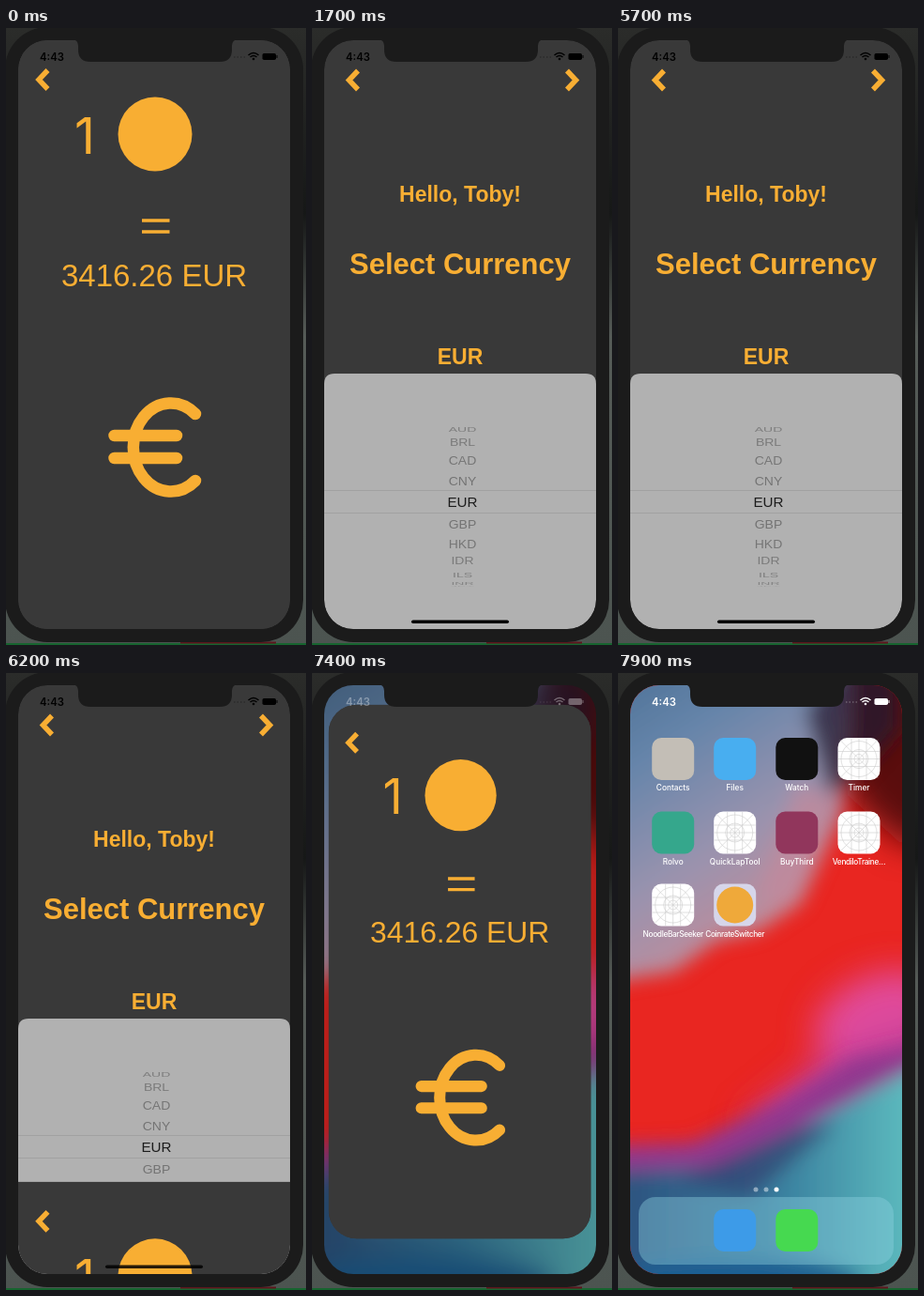
Recreate the animation shown at these times as an HTML page. Size 320x657 px, loop 8 s.

```html
<!DOCTYPE html>
<html lang="en">
<head>
<meta charset="utf-8">
<title>Currency converter</title>
<style>
html, body { margin: 0; width: 100%; height: 100%; overflow: hidden; background: #222; }
svg { display: block; width: 100vw; height: 100vh; }
text { text-anchor: middle; font-family: "Liberation Sans", Arial, sans-serif; }
.gold { fill: #f8ae33; }
.bold { font-weight: bold; }
.line { fill: none; stroke: #f8ae33; }
.ui, .label { font-family: Inter, Roboto, sans-serif; }
.label { font-size: 8.3px; font-weight: 500; fill: #fff; }
</style>
</head>
<body>
<svg viewBox="0 0 320 657" preserveAspectRatio="none">
  <defs>
    <linearGradient id="desk" x2="0" y2="1">
      <stop stop-color="#2b2c2a"/><stop offset=".3" stop-color="#161817"/>
      <stop offset=".5" stop-color="#555b57"/><stop offset="1" stop-color="#4c5450"/>
    </linearGradient>
    <linearGradient id="sky" x2=".5" y2="1">
      <stop stop-color="#3b638a"/><stop offset=".4" stop-color="#6685aa"/>
      <stop offset=".7" stop-color="#9a93ae"/><stop offset="1" stop-color="#c98a96"/>
    </linearGradient>
    <linearGradient id="sea">
      <stop offset=".15" stop-color="#2d5480"/><stop offset=".5" stop-color="#367a9c"/><stop offset=".85" stop-color="#5cb9bd"/>
    </linearGradient>
    <filter id="soft" x="-20%" y="-20%" width="140%" height="140%"><feGaussianBlur stdDeviation="10"/></filter>
    <filter id="softer" x="-60%" y="-60%" width="220%" height="220%"><feGaussianBlur stdDeviation="18"/></filter>
    <clipPath id="screen"><rect x="13" y="13" width="290" height="627" rx="31"/></clipPath>
    <clipPath id="cardClip"><rect id="card" x="13" y="13" width="290" height="627" rx="36"/></clipPath>
  </defs>

  <rect width="320" height="657" fill="url(#desk)"/>
  <path d="M0 656h320" stroke="#17642f" stroke-width="2"/>
  <path d="M186 654.5h102" stroke="#5f141d" stroke-width="2"/>
  <rect x="-1" y="-1" width="318" height="655" rx="45" fill="#1b1b1b"/>

  <g clip-path="url(#screen)">
    <g id="home">
      <rect x="-60" y="-60" width="440" height="780" fill="#e92621"/>
      <g filter="url(#softer)">
        <path d="M230-60H380V190L300 180 245 130z" fill="#5a0a10"/>
        <ellipse cx="275" cy="365" rx="70" ry="42" transform="rotate(-25 275 365)" fill="#e04c9c"/>
        <path d="M130 480L230 400 350 360V430L200 500z" fill="#c83f98"/>
      </g>
      <g filter="url(#soft)">
        <path d="M-50-50H250L247 60 238 150 195 245 150 275 105 285 60 318-50 335z" fill="url(#sky)"/>
        <path d="M190 120L232 130 215 200 180 250 150 235z" fill="#c3899c" opacity=".7"/>
        <path d="M200 40L240-10 300 0V60L255 110 225 130z" fill="#241a30" opacity=".75"/>
        <path d="M-50 505L80 500 175 455 250 410 370 385V450L210 500 90 550-50 550z" fill="#91388f"/>
        <path d="M-50 532L115 525 205 478 310 424 370 405V720H-50z" fill="url(#sea)"/>
        <path d="M60 540L190 485 235 480 140 560z" fill="#34406f" opacity=".7"/>
        <ellipse cx="120" cy="650" rx="140" ry="28" fill="#1d5f92"/>
      </g>
      <g id="icons"></g>
    </g>

    <g id="app" clip-path="url(#cardClip)">
      <rect x="13" y="13" width="290" height="627" fill="#393939"/>
      <g id="select">
        <path class="line" stroke-width="5.500" d="M49 45.500L39.500 55.500 49 65.500M272 45.500L281.500 55.500 272 65.500"/>
        <g class="gold bold">
          <text x="158" y="185" font-size="23">Hello, Toby!</text>
          <text x="158" y="262" font-size="31">Select Currency</text>
          <text x="158" y="357.500" font-size="23">EUR</text>
        </g>
        <path d="M13 640V379q0-11 11-11H292q11 0 11 11V640z" fill="#b1b1b1"/>
        <path d="M13 492.500H303M13 516.500H303" stroke="#a1a1a1"/>
        <g id="wheel"></g>
      </g>
      <g id="sheet">
        <rect x="13" y="13" width="290" height="627" fill="#393939"/>
        <path class="line" stroke-width="5.500" d="M44.500 45L35 55 44.500 65"/>
        <text class="gold ui" x="84" y="134" font-size="54">1</text>
        <circle class="gold" cx="159" cy="113" r="39.500"/>
        <path class="line" stroke-width="3.600" d="M145 205H174.500M145 217H174.500"/>
        <text class="gold" x="158" y="275" font-size="33">3416.26 EUR</text>
        <path class="line" stroke-width="12.500" stroke-linecap="round"
          d="M202 411A40 47 0 1 0 202 482M115.500 434H182M115.500 458H182"/>
      </g>
      <rect id="bar" x="106" y="630.500" width="104" height="3.500" rx="1.750"/>
    </g>
  </g>

  <path d="M71 12q6 1 6 7v4q0 13 13 13H228q13 0 13-13v-4q0-6 6-7z" fill="#1b1b1b"/>
  <g id="status">
    <text class="ui" x="49" y="34.500" font-size="11.300" font-weight="600">4:43</text>
    <path d="M243 31h12" stroke="currentColor" stroke-width="1.500" stroke-dasharray="1.500 2" opacity=".25"/>
    <path d="M258.500 29q5.500-5 11 0M260.500 31q3.500-3 7 0" fill="none" stroke="currentColor" stroke-width="1.500"/>
    <circle cx="264" cy="33" r="1.300"/>
    <rect x="273.500" y="27" width="14.500" height="7" rx="1.800"/>
    <path d="M289 29v3" stroke="currentColor"/>
  </g>
</svg>
<script>
const $ = id => document.getElementById(id);
const clamp = x => Math.min(1, Math.max(0, x));
const smooth = x => (x = clamp(x), x * x * (3 - 2 * x));
const mix = (a, b, p) => a + (b - a) * p;

// Currency wheel: rows sit on a cylinder of radius 90.8
const codes = "AUD BRL CAD CNY EUR GBP HKD IDR ILS INR JPY".split(" ");
$("wheel").innerHTML = codes.map((code, i) => {
  const k = i - 4, angle = k * .256, squash = Math.cos(angle);
  const y = 504.5 + 90.8 * Math.sin(angle);
  return `<text y="5.3" font-size="${k ? 14 : 15.2}" fill="${k ? "#737373" : "#1c1c1c"}"
    opacity="${k ? mix(.6, 1, squash) : 1}" transform="translate(160.500 ${y}) scale(1 ${squash})">${code}</text>`;
}).join("");

// Home screen icons
const columns = [58.7, 124.7, 190.8, 257], rows = [91.5, 170, 247];
const tile = (x, y, fill) =>
  `<rect x="${x - 22.5}" y="${y - 22.5}" width="45" height="45" rx="10" fill="${fill}"/>`;
const blank = (x, y) => tile(x, y, "#fff") +
  `<g transform="translate(${x} ${y})" fill="none" stroke="#ccc" stroke-width=".6">
  <path d="M-20-20L20 20M20-20L-20 20M-22 0H22M0-22V22M-8-22V22M8-22V22M-22-8H22M-22 8H22"/>
  <circle r="5"/><circle r="10"/><circle r="19"/></g>`;
const apps = [
  ["Contacts", "#c3beb6"], ["Files", "#48aef0"], ["Watch", "#111"], ["Timer"],
  ["Rolvo", "#35a78c"], ["QuickLapTool"], ["BuyThird", "#91365c"], ["VendiloTraine…"],
  ["NoodleBarSeeker"], ["CoinrateSwitcher", "#d6d6ea"]
];
$("icons").innerHTML = apps.map(([name, fill], i) => {
  const x = columns[i % 4], y = rows[i >> 2];
  const gap = name.length > 13 ? -.35 : 0;
  return (fill ? tile(x, y, fill) : blank(x, y)) +
    `<text class="label" x="${x}" y="${y + 33.5}" letter-spacing="${gap}">${name}</text>`;
}).join("") +
  `<circle cx="124.700" cy="247" r="19.500" fill="#efa93a"/>` +
  [147, 158, 169].map((x, i) =>
    `<circle cx="${x}" cy="550" r="2.500" fill="#fff" opacity="${i < 2 ? .45 : 1}"/>`).join("") +
  `<rect x="22" y="558" width="272" height="72" rx="18" fill="#8fd3e0" opacity=".4"/>` +
  tile(124.7, 593.5, "#3d9be8") + tile(190.8, 593.5, "#46d950");

// Share of a critically damped slide still to go after ms
const remaining = ms => {
  const a = .018 * Math.max(0, ms);
  return (1 + a) * Math.exp(-a);
};

function draw(t) {
  const down = t < 4000 ? 1 - remaining(t - 800) : remaining(t - 6162);
  $("sheet").setAttribute("transform", `translate(0 ${627 * down})`);
  $("select").style.display = down > .001 ? "" : "none";
  $("bar").setAttribute("opacity", down);

  // The app window shrinks into its icon
  const p = smooth((t - 7340) / 500);
  const width = mix(290, 45, p), height = mix(627, 45, p ** .72);
  const cx = mix(158, 124.7, p ** 1.4), cy = mix(326.5, 247, p ** .7);
  const scale = width / 290;
  $("card").setAttribute("height", height / scale);
  $("card").setAttribute("rx", mix(31, 60, p * p));
  $("app").setAttribute("transform",
    `translate(${cx - width / 2} ${cy - height / 2}) scale(${scale}) translate(-13 -13)`);
  $("app").setAttribute("opacity", 1 - smooth((p - .75) / .25));

  // The home screen comes into focus behind it
  const leaving = t > 7340;
  const haze = 1 - smooth((t - 7450) / 420);
  const size = 1 - .134 * haze;
  $("home").style.display = leaving ? "" : "none";
  $("home").style.filter = haze > 0 ? `blur(${9 * haze}px) brightness(${1 - .2 * haze})` : "none";
  $("icons").style.filter = haze > 0 ? `blur(${9 * haze}px)` : "none";
  $("icons").setAttribute("opacity", 1 - .3 * haze);
  $("icons").setAttribute("transform",
    `translate(158 327) scale(${size}) translate(-158 -327)`);
  $("status").style.color = $("status").style.fill = leaving ? "#fff" : "#000";
  $("status").style.opacity = leaving ? 1 - .65 * haze : 1;
}

function tick() {
  draw(performance.now() % 8000);
  requestAnimationFrame(tick);
}
tick();
</script>
</body>
</html>
```
